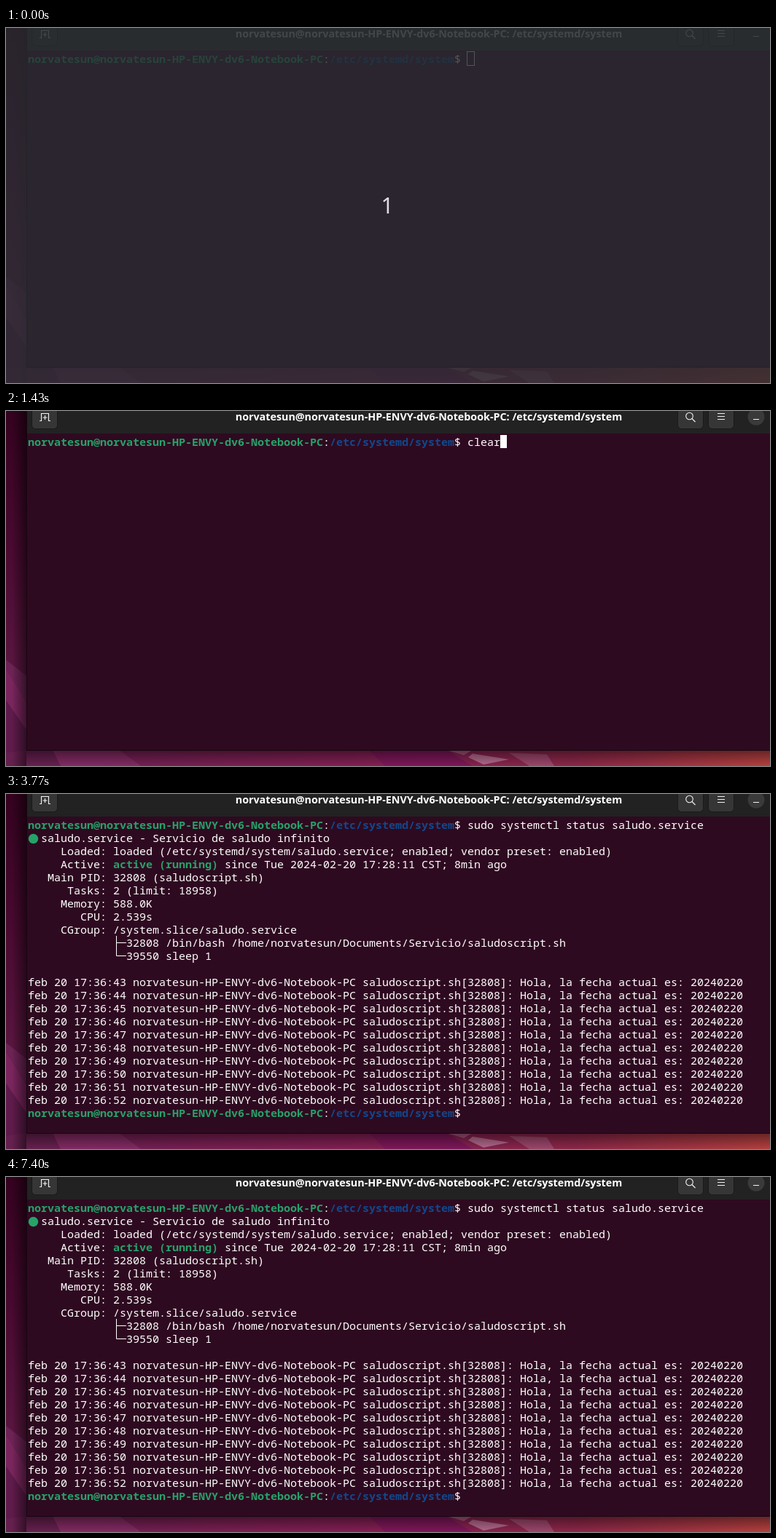
An HTML page for the animation above (8 s loop, 1048 px wide and 488 px high).

```html
<!DOCTYPE html>
<html lang="es">
<head>
<meta charset="utf-8">
<title>Terminal</title>
<style>
  html, body { margin: 0; width: 100%; height: 100%; overflow: hidden; background: #300a24; }
  svg { display: block; width: 1048px; height: 488px; }
  .mono { font: 15px "Noto Sans Mono", "DejaVu Sans Mono", monospace; fill: #fff; white-space: pre; }
  .green { fill: #26a269; font-weight: 700; }
  .blue { fill: #12488b; font-weight: 700; }
  #title { font: 700 14.3px "Noto Sans", "Open Sans", sans-serif; text-anchor: middle; }
  #count { font: 30px "Noto Sans", "Open Sans", sans-serif; text-anchor: middle; fill: #e2dbe6; }
  .btn { stroke: #191919; }
  .icon { fill: none; stroke-width: 1.1; }
</style>
</head>
<body>
<svg viewBox="0 0 1048 488" xmlns="http://www.w3.org/2000/svg">
  <defs>
    <linearGradient id="left" x2="0" y2="1">
      <stop offset="0" stop-color="#34021f"/>
      <stop offset=".4" stop-color="#4a0a31"/>
      <stop offset=".72" stop-color="#59163f"/>
      <stop offset="1" stop-color="#66204f"/>
    </linearGradient>
    <linearGradient id="bottom">
      <stop offset="0" stop-color="#6b1f52"/>
      <stop offset=".3" stop-color="#7a1f52"/>
      <stop offset=".52" stop-color="#861f54"/>
      <stop offset=".75" stop-color="#8c2748"/>
      <stop offset="1" stop-color="#b5403f"/>
    </linearGradient>
    <linearGradient id="shadeLeft">
      <stop offset="0" stop-opacity="0"/>
      <stop offset="1" stop-opacity=".5"/>
    </linearGradient>
    <linearGradient id="shadeDown" x2="0" y2="1">
      <stop offset="0" stop-opacity=".42"/>
      <stop offset="1" stop-opacity="0"/>
    </linearGradient>
  </defs>

  <g id="wallpaper">
    <rect width="30" height="488" fill="url(#left)"/>
    <rect y="466" width="1048" height="22" fill="url(#bottom)"/>
    <path d="M0 342L29 365V402L0 354Z" fill="#6d2355"/>
    <path d="M0 354L29 402V440L0 398Z" fill="#7a255d"/>
    <path d="M0 398L29 440V488H0Z" fill="#5f1b4b"/>
    <path d="M29 466H64L75 488H0V470Z" fill="#66204f"/>
    <path d="M64 466H155L185 488H75Z" fill="#822a62"/>
    <path d="M498 466H604L640 488H520Z" fill="#7d1759"/>
    <path d="M604 466H640L628 473Z" fill="#a3557c"/>
    <path d="M640 471L690 479L655 486L634 476Z" fill="#b0688a"/>
    <path d="M690 470L742 472L752 488H718Z" fill="#9c466b"/>
  </g>

  <g id="shadow">
    <rect x="8" width="20" height="488" fill="url(#shadeLeft)"/>
    <rect x="28" y="467" width="1020" height="21" fill="url(#shadeDown)"/>
  </g>

  <rect x="28" width="1020" height="467" fill="#160610"/>
  <rect id="body" x="29" y="31" width="1019" height="435"/>
  <rect id="header" x="29" width="1019" height="31"/>
  <text id="title" x="580" y="13">norvatesun@norvatesun-HP-ENVY-dv6-Notebook-PC: /etc/systemd/system</text>

  <g id="buttons" class="btn">
    <rect x="35.5" y="-10.5" width="35" height="35" rx="5"/>
    <rect x="921.5" y="-10.5" width="35" height="35" rx="5"/>
    <rect x="963.5" y="-10.5" width="35" height="35" rx="5"/>
  </g>
  <circle id="round" cx="1029" cy="8" r="11.5" fill="#3a3a3a"/>
  <g id="icons" class="icon">
    <path d="M46 13.5H48.5V3.5H58.5V13.5H61M53.5 6V12M50.5 9H56.5"/>
    <circle cx="937.5" cy="7" r="4.8"/>
    <path d="M941 10.5L945.5 15"/>
    <path d="M976 3.5H986M976 7.5H986M976 11.5H986M1025 11.5H1033"/>
  </g>

  <g id="term"></g>
  <rect id="hollow" x="632.5" y="32.5" width="10" height="19" fill="none" stroke="#fff"/>
  <rect id="cursor" width="9" height="18" fill="#fff"/>

  <g id="veil">
    <rect width="1048" height="488" fill="rgb(39,44,48)" opacity=".8"/>
    <text id="count" x="523" y="255">1</text>
  </g>
</svg>
<script>
const LOOP = 8000, CELL = 9, LINE = 18, LEFT = 30, TOP = 33;
const NS = "http://www.w3.org/2000/svg";
const $ = id => document.getElementById(id);
const user = "norvatesun", host = user + "-HP-ENVY-dv6-Notebook-PC";
const command = "sudo systemctl status saludo.service";

function add(parent, tag, attrs, text = "") {
  const el = document.createElementNS(NS, tag);
  for (const key in attrs) el.setAttribute(key, attrs[key]);
  el.textContent = text;
  return parent.appendChild(el);
}

function write(parent, row, col, text, cls = "") {
  return add(parent, "text", {
    x: LEFT + col * CELL, y: TOP + row * LINE + 15, class: "mono " + cls
  }, text);
}

function prompt(parent, row) {
  const id = user + "@" + host, path = "/etc/systemd/system";
  write(parent, row, 0, id, "green");
  write(parent, row, id.length, ":");
  write(parent, row, id.length + 1, path, "blue");
  write(parent, row, id.length + 1 + path.length, "$");
}

const term = $("term");
prompt(term, 0);
const typed = write(term, 0, 67, "");

const output = add(term, "g", {});
add(output, "circle", { cx: 37.5, cy: 61.5, r: 6.7, fill: "#26a269" });
write(output, 1, 2, "saludo.service - Servicio de saludo infinito");
const fields = [
  ["Loaded", "loaded (/etc/systemd/system/saludo.service; enabled; vendor preset: enabled)"],
  ["Active", ""],
  ["Main PID", "32808 (saludoscript.sh)"],
  ["Tasks", "2 (limit: 18958)"],
  ["Memory", "588.0K"],
  ["CPU", "2.539s"],
  ["CGroup", "/system.slice/saludo.service"]
];
fields.forEach(([name, value], i) => {
  write(output, i + 2, 11 - name.length, name + ": " + value);
});
write(output, 3, 13, "active (running)", "green");
write(output, 3, 30, "since Tue 2024-02-20 17:28:11 CST; 8min ago");
write(output, 9, 15, `32808 /bin/bash /home/${user}/Documents/Servicio/saludoscript.sh`);
write(output, 10, 15, "39550 sleep 1");
add(output, "path", {
  d: "M151.5 195V222.5H165M151.5 204.5H165", fill: "none", stroke: "#fff"
});
for (let i = 0; i < 10; i++) {
  write(output, 12 + i, 0,
    `feb 20 17:36:${43 + i} ${host} saludoscript.sh[32808]: Hola, la fecha actual es: 20240220`);
}
const lastPrompt = add(term, "g", {});
prompt(lastPrompt, 22);

// time, typed text, cursor column, cursor row, cursor shown
const steps = [
  [0, "", 67, 0, false],
  [430, "", 67, 0, true],
  [1000, "", 67, 0, false],
  [1400, "", 67, 0, true],
  [1430, "clear", 72, 0, true],
  [1770, command, 103, 0, true],
  [2300, command, 103, 0, false],
  [2900, command, 103, 0, true],
  [3200, command, 0, 22, true],
  [3230, command, 67, 22, true],
  [3770, command, 67, 22, false],
  [4370, command, 67, 22, true],
  [5000, command, 67, 22, false],
  [5600, command, 67, 22, true],
  [6200, command, 67, 22, false],
  [6800, command, 67, 22, true],
  [7400, command, 67, 22, false]
];

const show = (el, on) => el.setAttribute("visibility", on ? "visible" : "hidden");
const mix = (a, b, k) => `rgb(${a.map((v, i) => Math.round(v + (b[i] - v) * k))})`;
const grey = v => [v, v, v];

function draw(t) {
  const [, text, col, row, on] = steps.findLast(s => s[0] <= t);
  const focus = Math.max(0, Math.min(7, Math.floor((t - 430) / 33.3) + 1)) / 7;

  show($("veil"), t < 30);
  show($("hollow"), t < 430);
  show($("cursor"), on);
  show(output, t >= 3200);
  show(lastPrompt, t >= 3230);
  if (typed.textContent !== text) typed.textContent = text;
  $("cursor").setAttribute("x", LEFT + col * CELL);
  $("cursor").setAttribute("y", TOP + row * LINE);

  $("body").setAttribute("fill", mix([56, 12, 42], [46, 10, 32], focus));
  $("header").setAttribute("fill", mix(grey(44), grey(34), focus));
  $("title").setAttribute("fill", mix(grey(178), grey(255), focus));
  $("buttons").setAttribute("fill", mix(grey(50), grey(54), focus));
  $("icons").setAttribute("stroke", mix(grey(185), grey(245), focus));
  $("round").setAttribute("opacity", focus);
  $("shadow").setAttribute("opacity", 0.35 + 0.65 * focus);
}

const start = performance.now();
function tick() {
  draw((performance.now() - start) % LOOP);
  requestAnimationFrame(tick);
}
tick();
</script>
</body>
</html>
```
